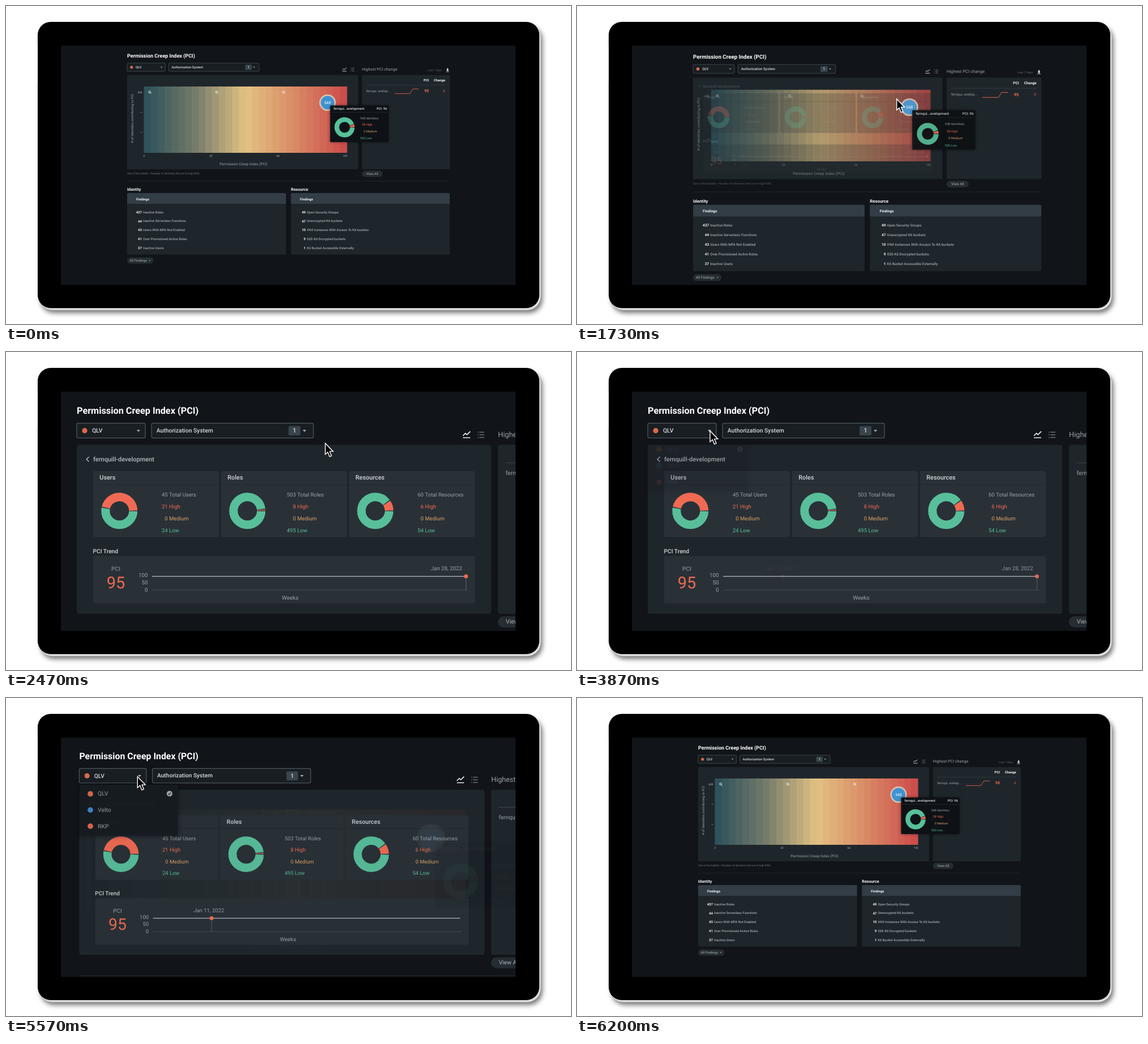
These frames come from a looping animation (998x561 px, 6530 ms). An HTML page with a canvas:

```html
<!DOCTYPE html>
<html lang="en">
<head>
<meta charset="utf-8">
<title>Permission Creep Index</title>
<style>
html, body { margin: 0; width: 100%; height: 100%; overflow: hidden; background: #fff; }
canvas { display: block; }
</style>
</head>
<body>
<canvas id="stage" width="998" height="561"></canvas>
<script>
const c = document.getElementById('stage').getContext('2d');
const LOOP = 6530, ZOOM = 1.794;
const RED = '#f06a53', GREEN = '#58bf9a', AMBER = '#d9a066', GRAY = '#98a1a7', DIM = '#6d767c';
const PANEL = '#1f262b', CARD = '#293137', LINE = '#38424a', WHITE = '#f2f4f5';
const BRANDS = [['QLV', '#d9694f'], ['Velto', '#3f86c9'], ['RKP', '#de6455']];

const clamp = v => Math.max(0, Math.min(1, v));

function text(str, x, y, size, color = GRAY, weight = 400, align = 'left') {
  c.font = `${weight} ${size}px Roboto, sans-serif`;
  c.fillStyle = color;
  c.textAlign = align;
  c.fillText(str, x, y);
}

function box(x, y, x2, y2, fill, r = 0, stroke) {
  c.beginPath();
  c.roundRect(x, y, x2 - x, y2 - y, r);
  if (fill) { c.fillStyle = fill; c.fill(); }
  if (stroke) { c.strokeStyle = stroke; c.lineWidth = 0.7; c.stroke(); }
}

function line(points, color, width = 1) {
  c.beginPath();
  points.forEach(([x, y]) => c.lineTo(x, y));
  c.strokeStyle = color;
  c.lineWidth = width;
  c.stroke();
}

function dot(x, y, r, color) {
  c.beginPath();
  c.arc(x, y, r, 0, 7);
  c.fillStyle = color;
  c.fill();
}

function caret(x, y, r = 1.7) {
  c.beginPath();
  c.moveTo(x - r, y - r / 2);
  c.lineTo(x + r, y - r / 2);
  c.lineTo(x, y + r / 2);
  c.fillStyle = '#b9c1c6';
  c.fill();
}

function layer(alpha, draw) {
  if (alpha <= 0) return;
  c.save();
  c.globalAlpha *= alpha;
  draw();
  c.restore();
}

function donut(x, y, outer, inner, share) {
  const r = (outer + inner) / 2, split = -2 * Math.PI * share, gap = 0.025;
  const arc = (from, to, color) => {
    c.beginPath();
    c.arc(x, y, r, from, to);
    c.strokeStyle = color;
    c.lineWidth = outer - inner;
    c.stroke();
  };
  arc(gap, 2 * Math.PI + split - gap, GREEN);
  arc(split + gap, -gap, RED);
}

// Numbers are right-aligned at x, labels follow after a space.
function legend(x, y, step, size, rows) {
  [GRAY, RED, AMBER, GREEN].forEach((color, i) => {
    const [n, label] = rows[i];
    text(n, x, y + i * step, size, color, 400, 'right');
    text(label, x + size * 0.25, y + i * step, size, color);
  });
}

function device() {
  c.fillStyle = '#fff';
  c.fillRect(0, 0, 998, 561);
  c.save();
  c.shadowColor = 'rgba(0,0,0,.55)';
  c.shadowBlur = 9;
  c.shadowOffsetX = 3;
  c.shadowOffsetY = 5;
  box(58, 31, 944.5, 536.5, '#dedede', 24);
  c.restore();
  box(56, 28, 942, 533, '#000', 23);
  line([[56.5, 70], [56.5, 134]], '#222', 1);
}

function findings(x, title, rows) {
  text(title, x, 324, 7.2, WHITE, 700);
  box(x, 330, x + 280.5, 438.5, PANEL, 2);
  box(x, 330, x + 280.5, 349, '#333d46', [2, 2, 0, 0]);
  text('Findings', x + 16, 341, 6, WHITE, 700);
  rows.forEach(([n, label], i) => {
    const y = 364 + i * 15.75;
    text(n, x + 26, y, 6, WHITE, 700, 'right');
    text(label, x + 28, y, 5.8, '#9fa7ad', 500);
  });
}

function dashboard() {
  text('Permission Creep Index (PCI)', 214, 88.7, 9.06, '#fff', 700);
  box(214, 100.7, 281.5, 115.2, '#181e22', 1.5, '#4b565d');
  box(287.6, 100.7, 447, 115.2, '#181e22', 1.5, '#4b565d');
  dot(221.8, 108, 2.6, BRANDS[0][1]);
  text(BRANDS[0][0], 229, 108.2, 5.8, '#d5dade', 500);
  text('Authorization System', 292.4, 108.1, 5.8, '#d5dade', 500);
  box(422.5, 103.6, 434.2, 112.7, '#39444c', 1);
  text('1', 428.3, 108.3, 6, '#d5dade', 500, 'center');
  caret(274.7, 108.2);
  caret(438.2, 108.2);
  line([[594.2, 113], [596.6, 110.6], [598.2, 112], [601.4, 108.8]], WHITE, 0.9);
  line([[594.2, 115], [601.4, 115]], WHITE, 0.8);
  for (let y = 109.5; y < 116; y += 2.6) {
    line([[608.6, y], [609.5, y]], DIM, 0.8);
    line([[610.4, y], [615.3, y]], DIM, 0.8);
  }

  text('Highest PCI change', 628.7, 112.3, 7.15);
  text('Last 7 days', 745, 114, 4.95, '#5d666d');
  line([[780, 109.8], [780, 113.4]], WHITE, 1.6);
  c.beginPath();
  c.moveTo(777.5, 112.4);
  c.lineTo(782.5, 112.4);
  c.lineTo(780, 115);
  c.fillStyle = WHITE;
  c.fill();
  line([[777.3, 116], [782.7, 116]], WHITE, 0.8);
  box(214, 122, 622, 288, PANEL, 2);
  box(628.7, 122, 784, 288, PANEL, 2);
  text('PCI', 747, 130.8, 5.9, WHITE, 700, 'right');
  text('Change', 775.8, 130.8, 5.9, WHITE, 700, 'right');
  line([[636, 139.6], [776, 139.6]], LINE, 0.6);
  text('fernqui..evelop...', 636.3, 150, 5.8);
  line([[687, 154.5], [713.6, 154.5], [718.7, 146.4], [729.4, 146.4]], RED, 0.8);
  text('95', 743, 150, 7, RED, 700, 'center');
  text('0', 773.6, 150, 6, '#c85743', 500, 'center');
  box(628.7, 290.6, 665, 301.6, '#252c32', 5.5);
  text('View All', 646.8, 296.2, 5.9, '#aab2b8', 400, 'center');

  line([[214, 309], [784, 309]], '#22292e', 0.8);
  findings(214, 'Identity', [
    ['437', 'Inactive Roles'], ['44', 'Inactive Serverless Functions'],
    ['43', 'Users With MFA Not Enabled'], ['41', 'Over Provisioned Active Roles'],
    ['37', 'Inactive Users']]);
  findings(503.3, 'Resource', [
    ['49', 'Open Security Groups'], ['47', 'Unencrypted K6 buckets'],
    ['10', 'VN4 Instances With Access To K6 buckets'], ['9', 'SSE-K6 Encrypted buckets'],
    ['1', 'K6 Bucket Accessible Externally']]);
  box(214, 443.4, 260.3, 454.4, '#252c32', 5.5);
  text('All Findings', 218.5, 449, 5.9, '#aab2b8');
  caret(253.8, 449.2, 1.4);
}

const STOPS = [[47, 82, 91], [120, 125, 108], [226, 194, 131], [217, 138, 101], [204, 78, 76]];
function heatColor(v) {
  const i = Math.min(3, Math.floor(v * 4)), k = v * 4 - i;
  return `rgb(${STOPS[i].map((a, j) => Math.round(a + (STOPS[i + 1][j] - a) * k))})`;
}

function heatmap() {
  const bands = 30, left = 243.5, width = 359;
  for (let i = 0; i < bands; i++) {
    c.fillStyle = heatColor(i / (bands - 1));
    c.fillRect(left + i * width / bands, 142, width / bands + (i < bands - 1 ? 0.4 : 0), 117);
  }
  [253.6, 372, 490.2].forEach(x => {
    c.beginPath();
    c.arc(x, 151.7, 1.9, 0, 7);
    c.strokeStyle = WHITE;
    c.lineWidth = 0.8;
    c.stroke();
    line([[x + 1.3, 153], [x + 3.2, 154.9]], WHITE, 0.9);
    line([[x - 1, 151.7], [x + 1, 151.7]], WHITE, 0.6);
  });
  text('658', 240.5, 153, 4.8, '#b0b8bd', 400, 'right');
  [187.5, 223].forEach(y => line([[237.5, y], [240.5, y]], GRAY, 0.7));
  ['0', '33', '66', '100'].forEach((s, i) =>
    text(s, 243.7 + i * 118.4, 264.6, 4.7, '#b0b8bd', 400, 'center'));
  text('Permission Creep Index (PCI)', 419.5, 279.2, 6.5, GRAY, 400, 'center');
  c.save();
  c.translate(223.6, 198.5);
  c.rotate(-Math.PI / 2);
  text('# of Identities contributing to PCI', 0, 0, 5.9, GRAY, 400, 'center');
  c.restore();
  text('Size of the bubble = Number of identities that are in high RISK', 214, 295.7, 4.7, DIM);
}

function tooltip() {
  dot(568, 170.5, 14.5, '#dcc5b0');
  dot(568, 170.5, 12, '#3f92d2');
  text('548', 568, 170.8, 6.8, '#fff', 400, 'center');
  c.save();
  c.shadowColor = 'rgba(0,0,0,.5)';
  c.shadowBlur = 5;
  box(572.6, 175.4, 675.8, 240, '#0e1216', 1.5);
  c.restore();
  text('fernqui...evelopment', 578.4, 181.4, 5.9, '#d5dade', 500);
  text('PCI: 96', 673, 181.4, 5.7, '#d5dade', 500, 'right');
  line([[572.6, 187.5], [675.8, 187.5]], '#2b333a', 0.6);
  donut(598, 214, 17.8, 9.6, 28 / 548);
  legend(634.8, 198.2, 11.7, 5.3,
    [['548', 'Identities'], ['28', 'High'], ['0', 'Medium'], ['520', 'Low']]);
}

function marker(x, dateX, date) {
  line([[x, 396], [x, 420]], '#59636b');
  dot(x, 395.7, 3.5, RED);
  text(date, dateX, 382, 9.7, GRAY, 400, 'center');
}

function detail(swap) {
  line([[146.5, 185], [142, 189.3], [146.5, 193.6]], '#b4bcc1', 1.4);
  text('fernquill-development', 154, 189.5, 11, '#b4bcc1', 500);
  [['Users', 45, 21, 285.7], ['Roles', 503, 8, 512], ['Resources', 60, 6, 737.7]]
    .forEach(([name, total, high, numX], i) => {
      const x = 154 + i * 226;
      box(x, 210, x + 222, 326.5, CARD, 3);
      line([[x, 234], [x + 222, 234]], '#20272c');
      text(name, x + 11.3, 222, 10.9, '#d0d6da', 500);
      donut(x + 46.3, 280.3, 32, 17, high / total);
      legend(numX, 252, 21, 9.5,
        [[total, 'Total ' + name], [high, 'High'], [0, 'Medium'], [total - high, 'Low']]);
    });
  text('PCI Trend', 153.5, 351.5, 10.2, '#d0d6da', 500);
  box(154, 360, 828.5, 443.5, CARD, 3);
  text('PCI', 194, 383, 10.2, GRAY, 400, 'center');
  text('95', 194, 408.5, 29, RED, 400, 'center');
  ['100', '50', '0'].forEach((s, i) => text(s, 250.5, 394 + i * 13, 9.8, GRAY, 400, 'right'));
  line([[258, 420], [816, 420]], '#424d55');
  line([[258, 395.7], [813, 395.7]], '#a0a7ac', 1.5);
  text('Weeks', 502, 434, 10, GRAY, 400, 'center');
  layer(1 - swap, () => marker(812.5, 778, 'Jan 28, 2022'));
  layer(swap, () => marker(364, 359, 'Jan 11, 2022'));
}

function dropdown() {
  c.save();
  c.shadowColor = 'rgba(0,0,0,.5)';
  c.shadowBlur = 8;
  box(125.5, 155, 303, 247, '#171c21', 2);
  c.restore();
  BRANDS.forEach(([name, color], i) => {
    const y = 171.3 + i * 29.2;
    dot(145, y, 5, color);
    text(name, 158.4, y + 0.4, 10.6);
  });
  dot(288, 171, 5.2, '#a3abb1');
  line([[285.6, 171], [287.4, 172.9], [290.5, 169.3]], '#171c21', 1.3);
}

function cursorAt(f) {
  if (f < 12 || f >= 186) return null;
  if (f < 71) {
    const dx = 328 * Math.exp(-0.153 * (f - 12));
    return [564 + dx, 161 + 3.5 * dx ** 0.453];
  }
  if (f < 166) {
    const u = clamp((f - 70) / 51), a = u ** 3.86, p = a / (a + (1 - u) ** 2.37);
    return [564 - 331 * p, 161 - 23 * p + 148 * p * (1 - p)];
  }
  const p = ((f - 166) / 20) ** 2;
  return [233 - 276 * p, 138 + 272 * p];
}

function cursor([x, y]) {
  c.beginPath();
  [[0, 0], [0, 19.5], [4.4, 15.6], [7.6, 23.6], [11, 22.2], [7.8, 14.4], [13.8, 14.4]]
    .forEach(([px, py]) => c.lineTo(x + px, y + py));
  c.closePath();
  c.fillStyle = '#000';
  c.strokeStyle = '#fff';
  c.lineWidth = 1.4;
  c.fill();
  c.stroke();
}

function render(ms) {
  const f = Math.floor((ms + 5) * 0.03); // the picture advances at 30 steps per second
  const back = clamp((f - 166) / 20);
  const zoom = clamp((f - 50) / 20) - back;
  const open = clamp((f - 47) / 20) - back;
  const menu = clamp((f - 114) / 20);

  c.textBaseline = 'middle';
  c.textRendering = 'geometricPrecision';
  device();
  c.save();
  c.beginPath();
  c.rect(97, 70, 803, 422);
  c.clip();
  c.fillStyle = '#11151a';
  c.fillRect(97, 70, 803, 422);

  c.save();
  const s = 1 + (ZOOM - 1) * zoom;
  c.transform(s, 0, 0, s, -258.9 * zoom, -55 * zoom);
  dashboard();
  layer(1 - open, heatmap);
  // Detail view and menu are laid out in fully zoomed coordinates.
  const zoomed = draw => {
    c.scale(1 / ZOOM, 1 / ZOOM);
    c.translate(258.9, 55);
    draw();
  };
  layer(open, () => zoomed(() => detail(menu)));
  layer(menu * (1 - back), () => zoomed(dropdown));
  layer(1 - zoom, tooltip);
  c.restore();

  const tip = cursorAt(f);
  if (tip) cursor(tip);
  c.restore();
}

const start = performance.now();
function tick() {
  render((performance.now() - start) % LOOP);
  requestAnimationFrame(tick);
}
tick();
</script>
</body>
</html>
```
